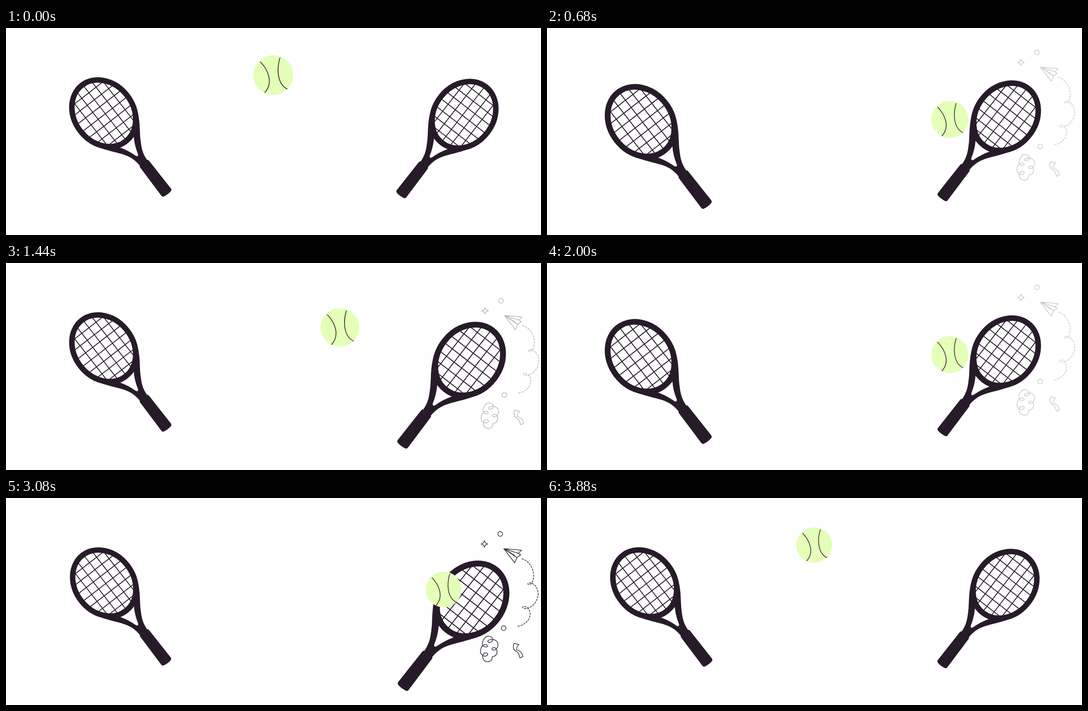
These frames come from a looping animation (1201 by 466 pixels, 3960 ms). An HTML page:

```html
<!DOCTYPE html>
<html lang="en">
<head>
<meta charset="utf-8">
<title>Tennis rally</title>
<style>
  html, body { margin: 0; width: 100%; height: 100%; overflow: hidden; background: #fff; }
  svg { display: block; width: 100%; height: 100%; }
  .line { fill: none; stroke: #271b2a; stroke-width: 1.6; stroke-linecap: round; stroke-linejoin: round; }
</style>
</head>
<body>
<svg viewBox="0 0 1201 466">
  <defs>
    <!-- Upright racket, origin at the centre of the head -->
    <g id="racket" fill="#271b2a">
      <path id="strings" fill="none" stroke="#271b2a" stroke-width="1.9"/>
      <ellipse rx="66" ry="80" fill="none" stroke="#271b2a" stroke-width="12.4"/>
      <path fill-rule="evenodd" d="M63,42 C53,66 36,84 27,100 C18,115 13,125 12,144 L-8.5,144
        C-9,126 -13,115 -20,104 C-29,89 -51,66 -62,42 L-52,44 C-35,84 35,84 53,44 Z
        M-18.5,83.5 Q1,88.5 20.5,83.5 Q10,99 4,120 Q1,125 -2,120 Q-8,100 -18.5,83.5 Z"/>
      <path d="M-8,142.5 Q1.5,140.5 12,142.5 Q14.5,143 14.5,147 L15,227 Q14.5,230 11,231
        Q1,233 -9,230.5 Q-12,229.5 -12,226 L-10.5,147 Q-10.5,143 -8,142.5 Z"/>
    </g>
    <g id="doodles" class="line">
      <circle cx="1111" cy="85" r="5.3"/>
      <circle cx="1118.7" cy="297" r="5.3"/>
      <path d="M1075.5,100 Q1076.5,106 1083,107.5 Q1076.5,109 1075.5,115 Q1074.5,109 1068,107.5 Q1074.5,106 1075.5,100 Z"/>
      <path d="M1119,118 L1159,121.5 L1151.5,128.5 L1157,132 L1148.5,138 L1143.5,150 Z M1151.5,128.5 L1119,118 L1148.5,138 M1119,118 L1143,133"/>
      <path stroke-dasharray="3.6 3.2" d="M1159.5,141 C1175,144 1188,165 1186,183 C1185,193 1180,200 1175,199
        C1171,198 1173,195 1178,195 C1190,197 1197,210 1196,222 C1194,240 1180,253 1167,253
        C1160,252 1160,248 1165,248 C1173,248 1179,258 1178,268 C1176,282 1163,291 1150,293"/>
      <path d="M1071,336 C1070,326 1077,314 1085,315 C1094,316 1097,324 1091,328 C1086,331 1081,328 1084,325
        C1092,319 1107,324 1106,335 C1105,344 1098,348 1094,346 C1090,343 1094,340 1099,341
        C1107,345 1105,361 1093,361 C1094,372 1083,375 1077,371 C1070,367 1070,356 1076,353
        C1082,351 1085,356 1081,359 C1073,363 1065,355 1067,346 C1068,338 1074,333 1079,334
        C1085,336 1083,341 1077,339 C1073,338 1071,337 1071,336 Z"/>
      <path d="M1142,331 L1153,334 C1149,338 1147,343 1148,346 C1156,347 1161,354 1162,361 L1155,364
        C1154,357 1152,353 1148,350 C1140,346 1139,339 1142,331 Z"/>
    </g>
  </defs>
  <use id="fxLeft" href="#doodles"/>
  <use id="fxRight" href="#doodles"/>
  <g id="left"><use href="#racket" transform="translate(219.5 192) rotate(-37.9)"/></g>
  <g id="right"><use href="#racket" transform="translate(1028 195.5) scale(-1 1) rotate(-37.9)"/></g>
  <g id="ball">
    <circle r="44.6" fill="#e4ffb8"/>
    <path class="line" stroke-width="1.8" d="M-29,-29.5 C-11,-11 .5,18 -19,39.5 M15,-38.5 C8,-16 7.5,19 31,31.5"/>
  </g>
</svg>
<script>
  const PERIOD = 1320, STEP = 40;
  const el = id => document.getElementById(id);

  const linear = u => u;
  const smooth = u => u * u * (3 - 2 * u);
  const easeOut = u => u * (2 - u);

  // Keys are [time, value, easing towards this key]
  function track(keys, t) {
    if (t <= keys[0][0]) return keys[0][1];
    for (let i = 1; i < keys.length; i++) {
      const [t1, b, ease = linear] = keys[i], [t0, a] = keys[i - 1];
      if (t <= t1) return a + (b - a) * ease((t - t0) / (t1 - t0));
    }
    return keys[keys.length - 1][1];
  }

  const ballX = [[0, 600], [590, 1009, easeOut], [965, 288, smooth], [1240, 600]];
  const ballY = [[0, 105.8], [590, 213, easeOut], [965, 164.8, smooth], [1240, 106]];
  const ballR = [[0, 44.6], [480, 39.9], [800, 42.8], [1080, 40]];
  const growRight = [[0, 1], [212, 1.104, smooth], [350, 1.104], [769, 1, smooth]];
  const growLeft = [[579, 1], [806, 1.109, smooth], [923, 1.109], [1240, 1, smooth]];
  const dipLeft = [[330, 1], [460, 0.99, smooth], [580, 1, smooth]];
  const fadeRight = [[0, 0], [400, 1], [760, 0]];
  const fadeLeft = [[880, 0], [1020, 1], [1240, 0]];
  const drift = [[350, 0], [769, 1, smooth]];

  const scaleAt = (s, x, y) => `translate(${x} ${y}) scale(${s}) translate(${-x} ${-y})`;

  function strings() {
    const a = 62, b = 76;
    let d = "";
    for (let x = -38.5; x < 50; x += 20.3) {
      const h = b * Math.sqrt(1 - x * x / (a * a));
      d += `M${x},${-h}V${h}`;
    }
    for (let y = -57; y < 70; y += 20) {
      const w = a * Math.sqrt(1 - y * y / (b * b));
      d += `M${-w},${y}H${w}`;
    }
    el("strings").setAttribute("d", d);
  }

  function draw(t) {
    const set = (id, value) => el(id).setAttribute("transform", value);
    const p = track(drift, t);
    set("ball", `translate(${track(ballX, t)} ${track(ballY, t)}) scale(${track(ballR, t) / 44.6})`);
    set("right", scaleAt(track(growRight, t), 841, -174));
    set("left", scaleAt(track(growLeft, t), 406, -224) + scaleAt(track(dipLeft, t), 330, 130));
    set("fxRight", `translate(${-13 * p} ${-34 * p})`);
    set("fxLeft", "translate(1254 0) scale(-1 1)");
    el("fxRight").setAttribute("opacity", track(fadeRight, t));
    el("fxLeft").setAttribute("opacity", track(fadeLeft, t));
  }

  const start = performance.now();
  function tick() {
    const t = (performance.now() - start) % PERIOD;
    draw(Math.floor(t / STEP) * STEP);
    requestAnimationFrame(tick);
  }
  strings();
  tick();
</script>
</body>
</html>
```
